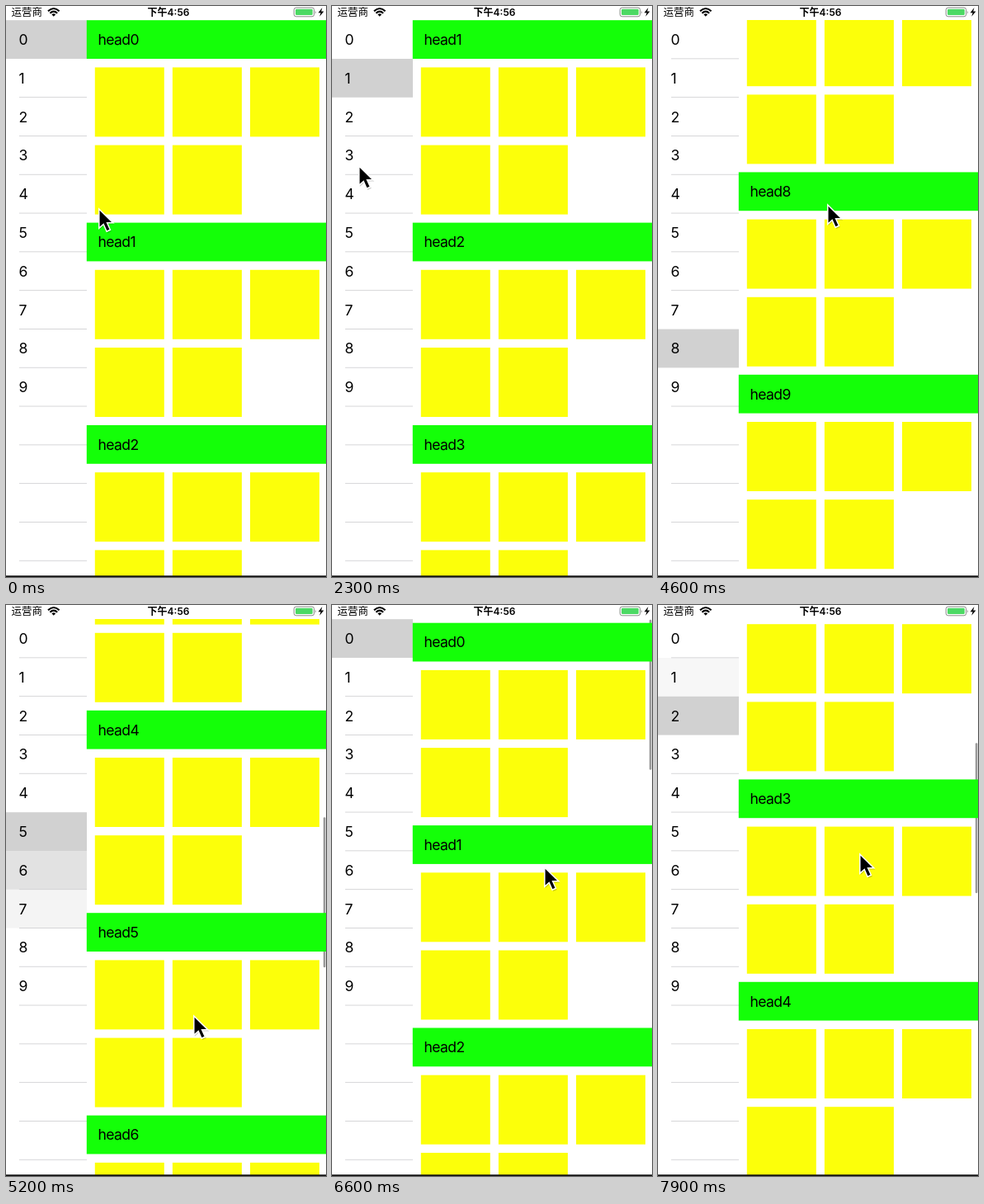
Animation, 388 px wide and 692 px high, one loop 8 s. Source, as an HTML page:

```html
<!DOCTYPE html>
<html lang="zh">
<head>
<meta charset="utf-8">
<style>
  html, body { margin: 0; width: 100%; height: 100%; overflow: hidden; background: #fff; }
  svg { display: block; width: 100vw; height: 100vh; }
  text { font-family: Inter, Roboto, sans-serif; font-size: 17.6px; letter-spacing: -.6px; fill: #000; }
  .status text { font: 500 12.5px "Noto Sans CJK SC", "Noto Sans CJK", sans-serif; letter-spacing: 0; }
  .status .time { font: 600 12px Inter, "Noto Sans CJK SC", "Noto Sans CJK", sans-serif; }
</style>
</head>
<body>
<svg id="stage" viewBox="0 0 388 692">
  <rect width="388" height="692" fill="#fff"/>
  <g id="rows"></g>
  <g id="cells"></g>
  <rect id="bar" x="384.8" width="2.6" rx="1.3" height="182" fill="#000" fill-opacity=".4"/>
  <g id="heads"></g>
  <g class="status">
    <rect width="388" height="17" fill="#fff"/>
    <text x="6.5" y="12">运营商</text>
    <g fill="none" stroke="#000" stroke-width="2.1">
      <path d="M51 6.2Q57.8-.2 64.6 6.2M53.4 8.7Q57.8 4.6 62.2 8.7"/>
      <path d="M57.8 12.8L55.4 10.3Q57.8 8.4 60.2 10.3Z" fill="#000" stroke="none"/>
    </g>
    <text class="time" x="197" y="11.5" text-anchor="middle">下午4:56</text>
    <rect x="349.2" y="2" width="24.4" height="10.8" rx="2.6" fill="#fff" stroke="#8a8a8a"/>
    <rect x="351" y="3.8" width="20.8" height="7.2" rx="1.2" fill="#4cd964"/>
    <path d="M374.9 5.4q1.6 2 0 4z" fill="#8a8a8a"/>
    <path d="M383.4 2L378.6 8.2H381.6L380.2 12.8L385.4 6.4H382.2Z"/>
  </g>
  <rect y="690.3" width="388" height="1.7" fill="#111"/>
  <g id="cursor">
    <path d="M1 2V25L6.5 20L10.5 29L15 27L11 18.5H18.5Z" fill="#000" opacity=".2"/>
    <path d="M0 0V23.4L5.4 18.4L9.3 27.2L13.6 25.3L9.8 16.8H17Z" stroke="#fff" stroke-width="1.5"/>
  </g>
</svg>
<script>
const LOOP = 8000, STEP = 100, TOP = 17.2, ROW = 46.8, SECTION = 245.4, COUNT = 10;
const MAX_SCROLL = 1779, LAG = 130, FADE = 280;
const $ = id => document.getElementById(id);

function add(parent, tag, attrs, text) {
  const el = document.createElementNS("http://www.w3.org/2000/svg", tag);
  for (const k in attrs) el.setAttribute(k, attrs[k]);
  if (text) el.textContent = text;
  return parent.appendChild(el);
}
const range = (n, f) => Array.from({ length: n }, (_, i) => f(i));

const fills = range(COUNT, i =>
  add($("rows"), "rect", { y: TOP + i * ROW, width: 98, height: ROW, fill: "#d1d1d1" }));
const lines = range(14, i =>
  add($("rows"), "rect", { x: 16, y: TOP + (i + 1) * ROW - .6, width: 82, height: .9, fill: "#d2d2d4" }));
range(COUNT, i => add($("rows"), "text", { x: 15.6, y: 47 + i * ROW }, String(i)));

const sections = range(COUNT, i => {
  const cells = add($("cells"), "g", {});
  for (let n = 0; n < 5; n++)
    add(cells, "rect", { x: 107.8 + n % 3 * 94.1, y: 57.2 + (n > 2) * 94.2, width: 84, height: 84, fill: "#fcff0a" });
  const head = add($("heads"), "g", {});
  add(head, "rect", { x: 97.8, width: 291, height: ROW, fill: "#14ff08" });
  add(head, "text", { x: 111.4, y: 29.8 }, "head" + i);
  return [cells, head];
});

// Row taps: time, row
const taps = [[1500, 1], [2500, 3], [3050, 5], [3750, 8]];
const DRAG = 4750, PULL = 7150;
// Dragged scroll offset: time, offset
const drag = [[4750, 1779], [4850, 1680], [4935, 1519], [5010, 1274], [5080, 1105], [5200, 871],
  [5500, 550], [5800, 350], [6000, 206], [6200, 60], [6350, -22], [6600, -4.5], [6700, 0],
  [7150, 0], [7280, 50], [7450, 160], [7610, 292], [7750, 410], [7900, 542], [8000, 620]];
// Pointer: time, x, y
const path = [[0, 112, 245], [300, 112, 245], [1200, 60, 112], [1450, 36, 92], [2050, 36, 92],
  [2300, 32, 193], [2750, 32, 193], [3000, 36, 285], [3300, 36, 285], [3600, 37, 400],
  [4200, 37, 400], [4600, 205, 240], [4750, 205, 240], [5000, 222, 470], [5200, 227, 497],
  [6000, 242, 412], [6600, 257, 317], [7050, 236, 490], [7150, 236, 490], [7600, 242, 330], [7900, 244, 301]];

const clamp = x => Math.min(1, Math.max(0, x));
const smooth = x => x * x * (3 - 2 * x);

function sample(keys, t, k, ease = x => x) {
  let i = 0;
  while (i < keys.length - 2 && t >= keys[i + 1][0]) i++;
  const a = keys[i], b = keys[i + 1];
  return a[k] + (b[k] - a[k]) * ease(clamp((t - a[0]) / (b[0] - a[0])));
}

function scrollAt(t) {
  if (t >= DRAG) return sample(drag, t, 1);
  return taps.reduce((s, [at, row]) =>
    s + (Math.min(row * SECTION, MAX_SCROLL) - s) * smooth(clamp((t - at) / 300)), 0);
}

// The list follows the headers that enter or leave at the top edge.
function selectedAt(t) {
  if (t < DRAG + LAG) return taps.reduce((r, [at, row]) => t >= at ? row : r, 0);
  const passed = Math.ceil((scrollAt(t - LAG) - ROW) / SECTION);
  return Math.max(0, Math.min(passed, 8));
}

function barAlpha(t) {
  if (t < DRAG) return 0;
  return t < PULL ? 1 - clamp((t - 6750) / 250) : 1;
}

function draw(t) {
  const s = scrollAt(t), sel = selectedAt(t);
  const glow = Array(COUNT).fill(0);
  for (let d = 0; d < FADE && d <= t; d += 5) {
    const r = selectedAt(t - d);
    glow[r] = Math.max(glow[r], (1 - d / FADE) ** 2);
  }
  fills.forEach((el, i) => el.setAttribute("opacity", glow[i]));
  lines.forEach((el, i) => el.setAttribute("opacity", i === sel || i === sel - 1 ? 0 : 1));
  sections.forEach((parts, i) => parts.forEach(el =>
    el.setAttribute("transform", `translate(0 ${TOP + i * SECTION - s})`)));
  $("bar").setAttribute("y", 19 + Math.max(s, -6) * .2735);
  $("bar").setAttribute("opacity", barAlpha(t));
  $("cursor").setAttribute("transform",
    `translate(${sample(path, t, 1, smooth) + .8} ${sample(path, t, 2, smooth) + 1})`);
}

const start = performance.now();
function tick() {
  const t = (performance.now() - start) % LOOP;
  draw(Math.floor(t / STEP) * STEP);
  requestAnimationFrame(tick);
}
tick();
</script>
</body>
</html>
```
